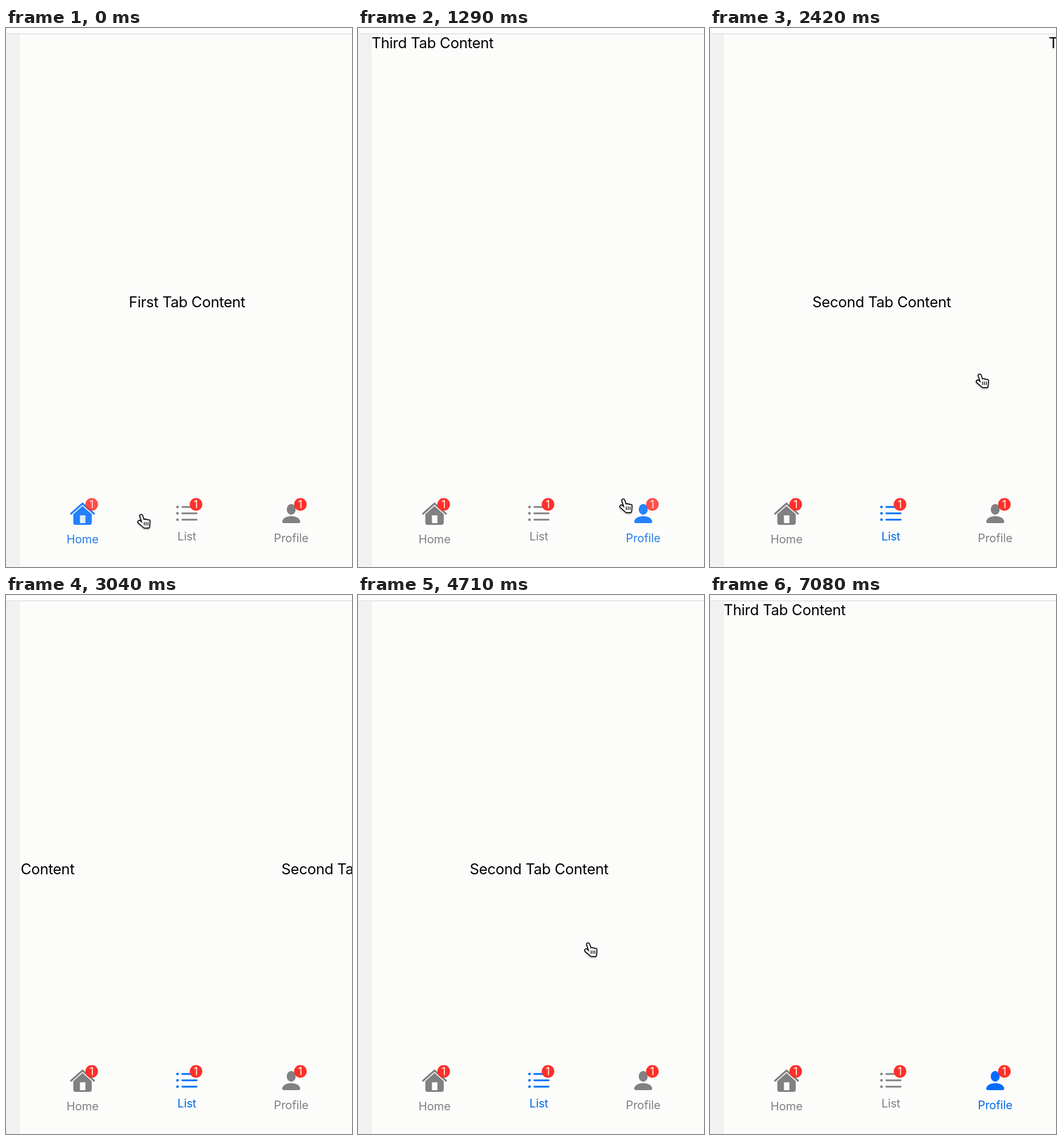
These frames come from a looping animation (600 by 934 pixels, 8000 ms). An HTML page with a canvas:

```html
<!DOCTYPE html>
<html lang="en">
<head>
<meta charset="utf-8">
<title>Swipeable tabs</title>
<style>
  html, body { margin: 0; width: 100%; height: 100%; overflow: hidden; background: #fcfcfb; }
  canvas { display: block; width: 600px; height: 934px; }
</style>
</head>
<body>
<canvas id="stage"></canvas>
<script>
const W = 600, H = 934, LOOP = 8000;
const LEFT = 24, PAGE = 580;
const BLUE = '#006dff', LABEL_BLUE = '#0069e6', GRAY = '#818184', RED = '#ff3028', BG = '#fcfcfb';
const FONT = 'Inter, "Liberation Sans", sans-serif';

const canvas = document.getElementById('stage');
const ctx = canvas.getContext('2d');
const dpr = window.devicePixelRatio || 1;
canvas.width = W * dpr;
canvas.height = H * dpr;

const clamp = u => Math.min(1, Math.max(0, u));
const smooth = u => u * u * (3 - 2 * u);

// Icons are drawn around the tab's centre line, y in stage pixels.
const roof = new Path2D('M-20 841.8 L0 824 L20 841.8');
const house = new Path2D('M-16 842.5 L0 828.3 L16 842.5 V857 Q16 861 12 861 H-12 Q-16 861 -16 857 Z');
const torso = new Path2D('M-15.5 854 C-13 848 -7 846 0 846 S13 848 15.5 854 Q16 858 12.5 858 H-12.5 Q-16 858 -15.5 854 Z');

function homeIcon() {
  stroke(roof, 3.2);
  ctx.fill(house);
  ctx.fillStyle = BG;
  ctx.fillRect(-4.5, 844.5, 9.5, 13.5);
}

function listIcon() {
  for (let y = 830; y < 860; y += 11) {
    disc(-16.2, y, 2.3);
    stroke(new Path2D(`M-8 ${y} H17`), 2.8);
  }
}

function personIcon() {
  disc(0, 834, 7.8, 9.2);
  ctx.fill(torso);
}

const tabs = [
  { label: 'Home', x: 132.7, base: 893, icon: homeIcon },
  { label: 'List', x: 313.6, base: 888, icon: listIcon },
  { label: 'Profile', x: 494.6, base: 891, icon: personIcon }
];

// Taps jump to a page on release; swipes slide there.
const taps = [-182, 568, 1110].map((at, tab) => ({ at, tab }));
const swipes = [
  { at: 2150, from: 2, to: 1 },
  { at: 2997, from: 1, to: 0 },
  { at: 3981, from: 0, to: 1 },
  { at: 4786, from: 1, to: 2 }
];
const DRAG = 130, LAG = 20, RETURN = 3670;

// The hand rests on each tapped tab, then flicks once per swipe.
const stops = [{ t: 0, x: 240, y: 855 }];
const stop = (t, x, y) => stops.push({ t, x, y });
const rest = ({ at, tab }) => [at - 220, at].forEach(t => stop(t, tabs[tab].x + 3, 865));
rest(taps[1]);
stop(750, 402, 766);
rest(taps[2]);
stop(1830, 294, 632);
for (const { at, from, to } of swipes) {
  const right = to < from;
  stop(at + LAG - DRAG, right ? 150 : 480, 616);
  stop(at + LAG, right ? 600 : 57, 610);
}
stop(RETURN, 579, 600);
stops.sort((a, b) => a.t - b.t);

function cursorAt(t) {
  const i = stops.findIndex(s => s.t > t);
  const a = stops[i - 1], b = stops[i];
  const u = smooth((t - a.t) / (b.t - a.t));
  return [a.x + (b.x - a.x) * u, a.y + (b.y - a.y) * u];
}

const cursorShown = t =>
  t < swipes[1].at + LAG || (t >= RETURN && t < swipes[3].at + LAG);

// Fast drag, then an exponential settle.
function slide(dt) {
  if (dt < 62) return 6.45 * dt;
  const left = 180 * Math.exp((62 - dt) / 87);
  return left < 3 ? PAGE : PAGE - left;
}

function scrollAt(t) {
  let x = 0;
  for (const p of taps) if (t >= p.at) x = p.tab * PAGE;
  for (const s of swipes) {
    if (t >= s.at) x = s.from * PAGE + (s.to - s.from) * slide(t - s.at);
  }
  return x;
}

function tabAt(t) {
  let tab = 0;
  for (const p of taps) if (t >= p.at) tab = p.tab;
  for (const s of swipes) if (t >= s.at + 250) tab = s.to;
  return tab;
}

// Dims while pressed and fades back after release.
function pressOpacity(t, tab) {
  const dt = t - taps[tab].at;
  return 1 - 0.8 * smooth(dt < 0 ? clamp(1 + dt / 100) : 1 - clamp(dt / 250));
}

function text(str, x, y, size, color, align = 'center', spacing = 0) {
  ctx.font = `400 ${size}px ${FONT}`;
  ctx.letterSpacing = spacing + 'px';
  ctx.textAlign = align;
  ctx.fillStyle = color;
  ctx.fillText(str, x, y);
}

function disc(x, y, rx, ry = rx) {
  ctx.beginPath();
  ctx.ellipse(x, y, rx, ry, 0, 0, Math.PI * 2);
  ctx.fill();
}

function stroke(path, width) {
  ctx.lineWidth = width;
  ctx.lineCap = ctx.lineJoin = 'round';
  ctx.stroke(path);
}

function drawTab(tab, active, alpha) {
  ctx.save();
  ctx.globalAlpha = alpha;
  ctx.translate(tab.x, 0);
  ctx.fillStyle = ctx.strokeStyle = active ? BLUE : GRAY;
  tab.icon();
  text(tab.label, 0, tab.base, 20, active ? LABEL_BLUE : GRAY, 'center', -0.1);
  ctx.fillStyle = RED;
  disc(15.9, 825.5, 10.9);
  text('1', 15.6, 832, 18, '#fff');
  ctx.restore();
}

function drawPages(scroll) {
  const title = (str, x, y, align) => text(str, x, y, 25.5, '#000', align, -0.3);
  ctx.save();
  ctx.beginPath();
  ctx.rect(LEFT, 11, W - LEFT, H);
  ctx.clip();
  ctx.translate(LEFT - scroll, 0);
  title('First Tab Content', PAGE / 2, 484);
  title('Second Tab Content', PAGE * 1.5, 484);
  title('Third Tab Content', PAGE * 2 - 0.5, 35, 'left');
  ctx.restore();
}

// Index finger, three folded fingers and thumb as overlapping round strokes.
const hand = new Path2D('M6.5 4 L10.5 16 M3.2 14.4 L12 22');
const creases = new Path2D();
for (let i = 0; i < 3; i++) {
  const x = 12.8 + 3.2 * i;
  hand.moveTo(x, 12 + 0.7 * i);
  hand.lineTo(x - 0.4 * i, 22.5);
  creases.moveTo(x - 1, 15);
  creases.lineTo(x - 1, 20);
}

function drawCursor(x, y) {
  ctx.save();
  ctx.translate(x - 12, y - 13.5);
  ctx.shadowColor = 'rgba(0,0,0,.35)';
  ctx.shadowBlur = 3 * dpr;
  ctx.shadowOffsetY = 1.5 * dpr;
  ctx.strokeStyle = '#000';
  stroke(hand, 6.8);
  ctx.shadowColor = 'transparent';
  ctx.strokeStyle = '#fff';
  stroke(hand, 3.7);
  ctx.strokeStyle = '#000';
  stroke(creases, 1.3);
  ctx.restore();
}

function draw(t) {
  ctx.setTransform(dpr, 0, 0, dpr, 0, 0);
  ctx.fillStyle = BG;
  ctx.fillRect(0, 0, W, H);
  ctx.fillStyle = '#f1f1f0';
  ctx.fillRect(0, 11, LEFT, H);
  ctx.fillStyle = '#d9d9dd';
  ctx.fillRect(0, 9.5, W, 1.2);

  drawPages(scrollAt(t));
  const current = tabAt(t);
  tabs.forEach((tab, i) => drawTab(tab, i === current, pressOpacity(t, i)));
  if (cursorShown(t)) drawCursor(...cursorAt(t));
}

const start = performance.now();
function tick() {
  draw((performance.now() - start) % LOOP);
  requestAnimationFrame(tick);
}
tick();
</script>
</body>
</html>
```
